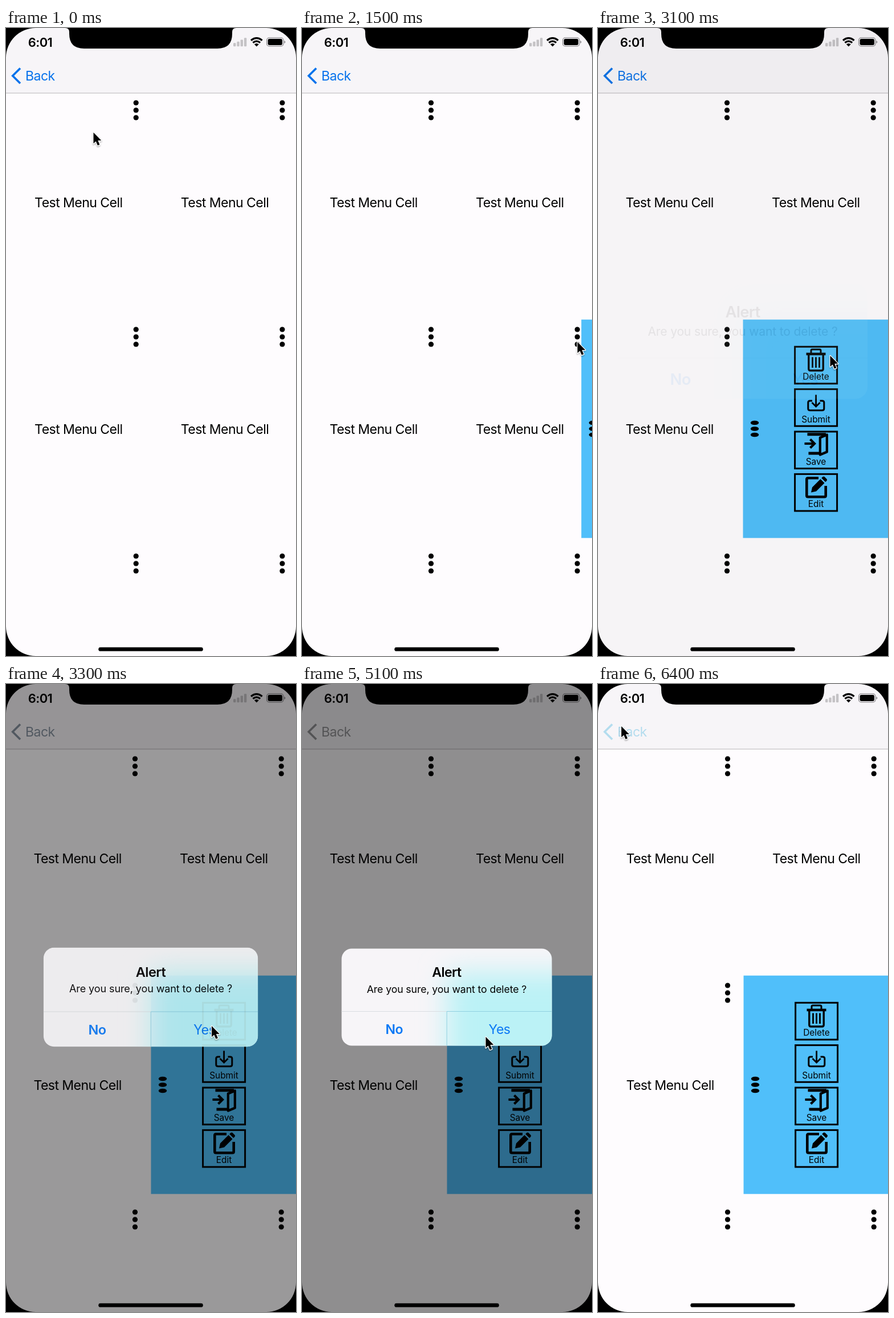
An HTML page that plays this animation: 509 px wide and 1100 px high, repeating every 6.5 s.

```html
<!DOCTYPE html>
<html lang="en">
<head>
<meta charset="utf-8">
<title>Cell menu</title>
<style>
  html, body { margin: 0; width: 100%; height: 100%; overflow: hidden; background: #000; }
  svg { display: block; width: 509px; height: 1100px; }
  text { font-family: Inter, "Liberation Sans", sans-serif; font-size: 23.1px; letter-spacing: -.025em; }
  .mid { text-anchor: middle; }
  .label { font-size: 15.4px; letter-spacing: 0; text-anchor: middle; }
  .line { fill: none; stroke: #000; stroke-width: 3; }
</style>
</head>
<body>
<svg viewBox="0 0 509 1100">
  <defs>
    <clipPath id="alertShape"><rect x="69.5" y="463.5" width="369" height="170" rx="18"/></clipPath>
    <filter id="soft" x="-50%" y="-50%" width="200%" height="200%"><feGaussianBlur stdDeviation="24"/></filter>
    <filter id="shade" x="-50%" y="-50%" width="200%" height="200%">
      <feDropShadow dx="0" dy="1.5" stdDeviation="1.3" flood-opacity=".35"/>
    </filter>
  </defs>

  <rect width="509" height="1100" fill="#fefcfe"/>
  <g id="content">
    <g id="cells"></g>
    <g id="panel">
      <rect x="254.5" y="510.7" width="262" height="382.6" fill="#50bffa"/>
      <ellipse cx="275" cy="691.5" rx="7.2" ry="3.8"/>
      <ellipse cx="275" cy="702" rx="7.2" ry="3.8"/>
      <ellipse cx="275" cy="712.5" rx="7.2" ry="3.8"/>
      <g id="buttons"></g>
      <g class="line">
        <!-- trash can -->
        <path d="M365.5 571H399.5" stroke-width="4.5"/>
        <path d="M374 569V565Q374 563 376 563H389Q391 563 391 565V569"/>
        <path d="M369.8 573V597Q369.8 600 372.8 600H392.2Q395.2 600 395.2 597V573" stroke-width="3.4"/>
        <path d="M376.5 576.5V595M382.5 576.5V595M388.5 576.5V595" stroke-width="2.8"/>
        <!-- tray -->
        <path d="M376 653H372Q368.8 653 368.8 656V666.5Q368.8 669.8 372 669.8H393.5Q396.8 669.8 396.8 666.5V656Q396.8 653 393.5 653H389.5"/>
        <path d="M382.6 642.5V662.5M375.5 656L382.6 663L389.7 656" stroke-width="2.8"/>
        <!-- door -->
        <path d="M367.5 711.8H400M369.5 745H389" stroke-width="5"/>
        <path d="M389.8 717.5L401.8 712.5V742.5L389.8 747.5Z" stroke-width="4.2" stroke-linejoin="round"/>
        <path d="M362.5 728H378M372.5 720.5L380 728L372.5 735.5" stroke-width="4.2"/>
        <!-- notepad -->
        <path d="M387 788.3H368.5Q366.3 788.3 366.3 790.5V819Q366.3 821.3 368.5 821.3H397.5Q399.7 821.3 399.7 819V802" stroke-width="4.6"/>
      </g>
      <path d="M374 813.5L376 804.5L390.5 790L397.5 797L383 811.5ZM392.2 788.3L394.5 786Q396 784.8 397.5 786L401.5 790Q402.6 791.5 401.5 793L399.2 795.3Z"/>
    </g>
  </g>

  <rect width="509" height="114" fill="#f7f5f8"/>
  <rect y="113.4" width="509" height="1.2" fill="#c3c1c4"/>
  <g id="back">
    <path d="M25 70.5L11.7 83.8L25 97.1" fill="none" stroke="currentColor" stroke-width="3.6"/>
    <text x="34" y="92" fill="currentColor">Back</text>
  </g>
  <text class="mid" x="60" y="32.6" style="font-size:22px;font-weight:600">6:01</text>
  <g id="signal" fill="#c4c2c5"></g>
  <path d="M439.8 32.5L435.8 28.4Q439.8 25.4 443.8 28.4Z"/>
  <path d="M433.4 25.8Q439.8 20.6 446.2 25.8M430 21.7Q439.8 13.6 449.6 21.7" fill="none" stroke="#000" stroke-width="3.2"/>
  <rect x="457.6" y="17.1" width="29.4" height="14.8" rx="4.4" fill="none" stroke="#8d8b8e" stroke-width="1.3"/>
  <rect x="459.6" y="19.1" width="25.4" height="10.8" rx="2.6"/>
  <path d="M488.4 22Q490.4 23 490.4 24.5T488.4 27Z" fill="#8d8b8e"/>

  <rect id="dim" width="509" height="1100"/>
  <g id="alert">
    <g clip-path="url(#alertShape)">
      <rect x="69" y="463" width="370" height="171" fill="#f7f5f8"/>
      <rect x="254" y="505" width="300" height="300" fill="#bbf2f6" filter="url(#soft)"/>
      <path d="M69 573.5H254" stroke="#d9dde1" fill="none"/>
      <path d="M254 573.5H439M254.2 573.5V634" stroke="#90d0e0" fill="none"/>
    </g>
    <text class="mid" x="254" y="513.3" style="font-weight:600">Alert</text>
    <text class="mid" x="254" y="540.5" style="font-size:17.7px;letter-spacing:-.006em">Are you sure, you want to delete ?</text>
    <g fill="#0a78f5">
      <text class="mid" x="161.8" y="612.7" style="font-weight:600">No</text>
      <text class="mid" x="346.5" y="612.7">Yes</text>
    </g>
  </g>

  <!-- device frame: rounded screen corners, notch, home bar -->
  <path fill-rule="evenodd" d="M-2 -2H511V1102H-2ZM52 0Q0 0 0 0A52 52 0 0 0 0 0Z" fill="none"/>
  <path id="corners" fill-rule="evenodd"/>
  <path d="M104 0Q111 0 111 7V10Q111 36 137 36H371Q397 36 397 10V7Q397 0 404 0Z"/>
  <rect x="162.3" y="1084.8" width="183.5" height="6.8" rx="3.4"/>

  <path id="cursor" d="M0 0V19.3L4.3 15.4L7.4 22.8L10.9 21.3L7.8 14.1H13.8Z" stroke="#fff" stroke-width="2.4"
        stroke-linejoin="round" paint-order="stroke" filter="url(#shade)"/>
</svg>

<script>
const LOOP = 6500, STEP = 100;
const $ = id => document.getElementById(id);
const clamp = x => Math.min(1, Math.max(0, x));
const mix = (a, b, p) => a + (b - a) * p;
const smooth = x => x * x * (3 - 2 * x);

// Critically damped spring, time in ms since it was released.
function spring(ms) {
  const x = Math.max(0, ms) * 0.0175;
  return 1 - (1 + x) * Math.exp(-x);
}

// cubic-bezier(.42, 0, .58, 1)
function easeInOut(x) {
  let lo = 0, hi = 1;
  for (let i = 0; i < 24; i++) {
    const s = (lo + hi) / 2, r = 1 - s;
    if (3 * r * r * s * 0.42 + 3 * r * s * s * 0.58 + s * s * s < x) lo = s; else hi = s;
  }
  return smooth(lo);
}

function buildScene() {
  let cells = '';
  for (const col of [0, 256.7]) {
    for (const row of [0, 397, 794]) {
      for (const y of [131, 144, 157])
        cells += `<circle cx="${226.5 + col}" cy="${y + row}" r="4.6"/>`;
      if (row < 700)
        cells += `<text class="mid" x="${125.6 + col}" y="${314.2 + row}">Test Menu Cell</text>`;
    }
  }
  $('cells').innerHTML = cells;

  $('buttons').innerHTML = ['Delete', 'Submit', 'Save', 'Edit'].map((name, i) => {
    const y = 558.3 + i * 74.35;
    return `<rect class="line" x="345.6" y="${y}" width="74" height="64.6"/>
      <text class="label" x="382.5" y="${y + 57.9}">${name}</text>`;
  }).join('');

  $('signal').innerHTML = [6, 8.5, 11.8, 15].map((h, i) =>
    `<rect x="${399 + i * 6.3}" y="${32.2 - h}" width="4.4" height="${h}" rx="1.2"/>`).join('');

  const R = 52;
  $('corners').setAttribute('d', `M0 0H509V1100H0Z M${R} 0H${509 - R}A${R} ${R} 0 0 1 509 ${R}
    V${1100 - R}A${R} ${R} 0 0 1 ${509 - R} 1100H${R}A${R} ${R} 0 0 1 0 ${1100 - R}V${R}A${R} ${R} 0 0 1 ${R} 0Z`);
}

// Pointer stops: time, x, y
const STOPS = [
  [0, 153.5, 183], [1100, 483.5, 550], [1550, 483.5, 550], [2200, 331, 699],
  [2900, 407.5, 574], [3100, 407.5, 574], [3300, 361, 599], [3700, 345, 612],
  [5000, 322.5, 618], [5300, 322.5, 618], [6150, 41, 74], [LOOP, 41, 74]
];

function pointerAt(t) {
  const i = STOPS.findIndex(s => s[0] > t);
  const [t0, x0, y0] = STOPS[i - 1], [t1, x1, y1] = STOPS[i];
  const p = smooth((t - t0) / (t1 - t0));
  return [mix(x0, x1, p), mix(y0, y1, p)];
}

function render(t) {
  const push = 1.7 * Math.exp(-t / 130);
  const pop = t >= 6400 ? 1 : 0;
  $('content').setAttribute('transform', `translate(${push + pop} 0)`);

  const slide = 254.5 * (1 - easeInOut(clamp((t - 1310) / 1000)));
  $('panel').setAttribute('transform', `translate(${slide} 0)`);
  $('panel').style.display = t > 1310 ? '' : 'none';

  const enter = spring(t - 3076);
  const shown = enter * (1 - spring(t - 5130));
  const scale = mix(1.2, 1, enter);
  $('dim').setAttribute('opacity', 0.44 * shown);
  $('alert').setAttribute('opacity', shown);
  $('alert').setAttribute('transform', `translate(254 548.5) scale(${scale}) translate(-254 -548.5)`);

  const rgb = [[6, 114, 236], [148, 148, 151]];
  $('back').style.color = `rgb(${rgb[0].map((c, i) => Math.round(mix(c, rgb[1][i], shown)))})`;
  const pressed = t >= 6250;
  if (pressed) $('back').style.color = '#b3dcee';

  $('cursor').setAttribute('transform', `translate(${pointerAt(t)})`);
}

buildScene();
const start = performance.now();
function tick() {
  const t = (performance.now() - start) % LOOP;
  render(Math.floor(t / STEP) * STEP);
  requestAnimationFrame(tick);
}
tick();
</script>
</body>
</html>
```
